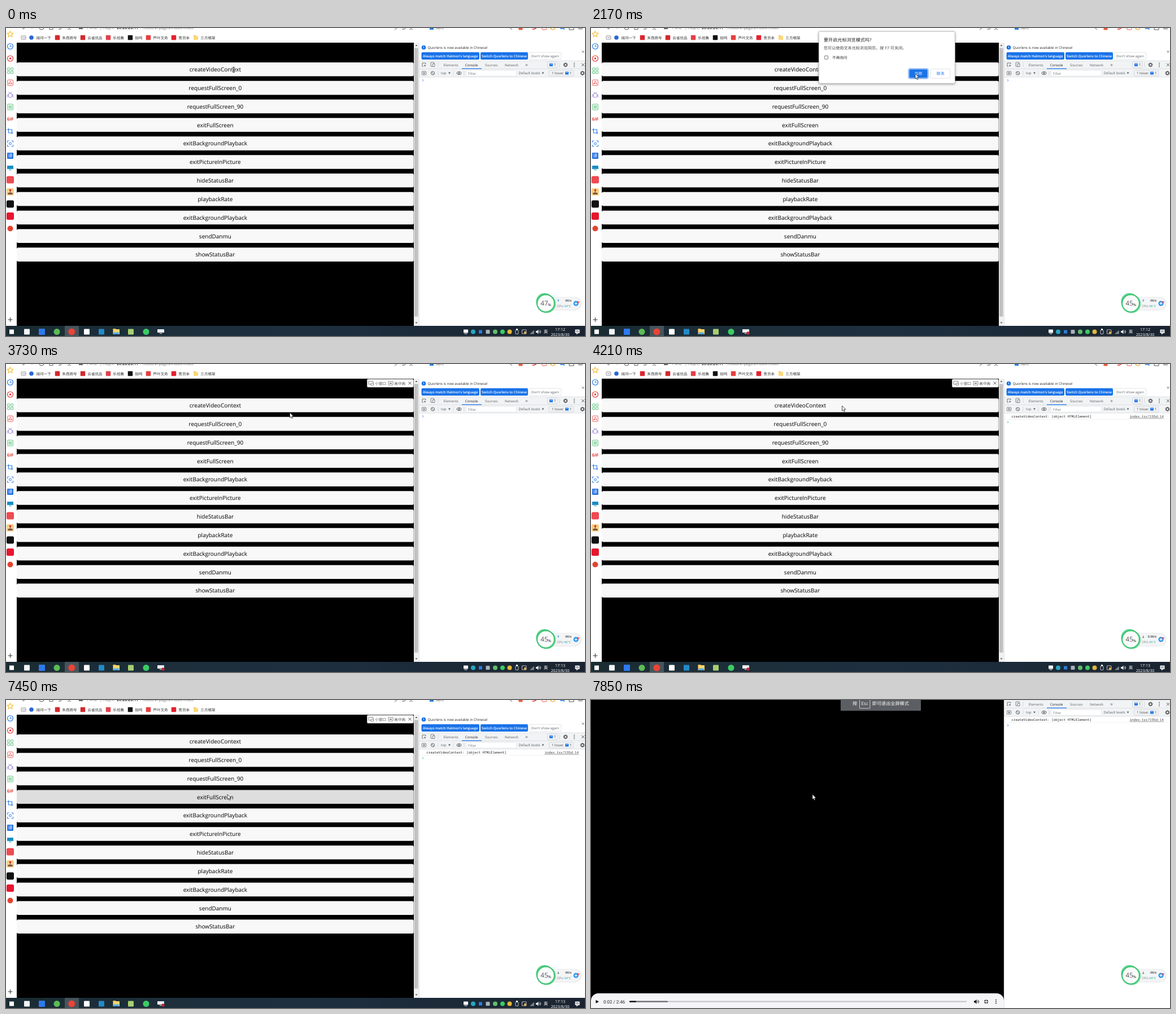
Write an HTML page with a canvas that moves like this. It is 1025 px wide and 546 px high and loops after 7990 ms.

```html
<!DOCTYPE html>
<html lang="zh">
<head>
<meta charset="utf-8">
<title>Video context demo</title>
<style>
html, body { margin: 0; width: 100%; height: 100%; overflow: hidden; background: #fff; }
canvas { display: block; width: 1025px; height: 546px; }
</style>
</head>
<body>
<canvas id="stage"></canvas>
<script>
const W = 1025, H = 546, LOOP = 7990;
const SANS = '"Open Sans", "Noto Sans CJK SC", "Noto Sans CJK", sans-serif';
const MONO = '"Noto Sans Mono", "DejaVu Sans Mono", monospace';
const BLUE = '#1a73e8', GREY = '#5f6368', RED = '#e53935', GREEN = '#2fb45a', SKY = '#2b7de9';
const canvas = document.getElementById('stage');
const ctx = canvas.getContext('2d');
const dpr = window.devicePixelRatio || 1;
canvas.width = W * dpr;
canvas.height = H * dpr;

function box(x, y, w, h, fill, r = 0, stroke) {
  ctx.beginPath();
  ctx.roundRect(x, y, w, h, r);
  if (fill) { ctx.fillStyle = fill; ctx.fill(); }
  if (stroke) { ctx.strokeStyle = stroke; ctx.lineWidth = 0.8; ctx.stroke(); }
}
function square(x, y, s, color, r = 1) { box(x - s / 2, y - s / 2, s, s, color, r); }
function disc(x, y, r, color) {
  ctx.beginPath();
  ctx.arc(x, y, r, 0, 7);
  ctx.fillStyle = color;
  ctx.fill();
}
function ring(x, y, r, color, w = 1) {
  ctx.beginPath();
  ctx.arc(x, y, r, 0, 7);
  ctx.strokeStyle = color;
  ctx.lineWidth = w;
  ctx.stroke();
}
// Points are relative to x, y; a fill colour closes the shape.
function path(x, y, pts, stroke, w = 1, fill) {
  ctx.beginPath();
  for (let i = 0; i < pts.length; i += 2) ctx.lineTo(x + pts[i], y + pts[i + 1]);
  if (fill) { ctx.closePath(); ctx.fillStyle = fill; ctx.fill(); }
  if (stroke) { ctx.strokeStyle = stroke; ctx.lineWidth = w; ctx.stroke(); }
}
function text(s, x, y, size, color = '#222', align = 'left', weight = 400, font = SANS) {
  ctx.font = `${weight} ${size}px ${font}`;
  ctx.textAlign = align;
  ctx.fillStyle = color;
  ctx.fillText(s, x, y + size * 0.36);
}
function cross(x, y, r, color, w = 0.9) {
  path(x, y, [-r, -r, r, r], color, w);
  path(x, y, [-r, r, r, -r], color, w);
}
function plus(x, y, r, color, w = 1) {
  path(x, y, [-r, 0, r, 0], color, w);
  path(x, y, [0, -r, 0, r], color, w);
}
function caret(x, y, color = GREY) { path(x, y, [-2, -1.5, 2, -1.5, 0, 1.8], null, 0, color); }
function dots(x, y, color) { for (const d of [-3, 0, 3]) disc(x, y + d, 0.9, color); }
function gear(x, y) {
  for (let i = 0; i < 8; i++) {
    const a = i * Math.PI / 4;
    path(x, y, [Math.cos(a) * 3, Math.sin(a) * 3, Math.cos(a) * 4, Math.sin(a) * 4], '#555', 1.4);
  }
  ring(x, y, 2.4, '#555', 1.5);
}
function monitorIcon(x, y, color, w = 9) {
  box(x - w / 2, y - 4, w, 6, color, 0.6);
  box(x - 2.2, y + 3, 4.4, 1, color);
}
function folder(x, y) {
  box(x - 4, y - 4, 4, 2, '#eebf4e');
  box(x - 4, y - 3, 8, 7, '#fbd775', 0.5);
}
function star(x, y, r, color, fill) {
  const pts = [];
  for (let i = 0; i < 11; i++) {
    const a = i * Math.PI / 5 - Math.PI / 2, q = i % 2 ? r * 0.48 : r;
    pts.push(q * Math.cos(a), q * Math.sin(a));
  }
  path(x, y, pts, color, 1.1, fill);
}
function speaker(x, y, color) {
  path(x, y, [-4, -1.5, -2, -1.5, 0.5, -4, 0.5, 4, -2, 1.5, -4, 1.5], null, 0, color);
  for (const r of [2, 4]) {
    ctx.beginPath();
    ctx.arc(x + 0.5, y, r, -0.9, 0.9);
    ctx.strokeStyle = color;
    ctx.lineWidth = 0.9;
    ctx.stroke();
  }
}

// Pointer moves: start, end, steps, x, y, sag.
const moves = [
  [860, 1500, 10, 577, 77, 3],
  [2030, 2170, 3, 574, 81, 0],
  [2370, 2640, 4, 575, 81.5, 0],
  [3390, 3940, 9, 444.5, 74, 9],
  [4410, 5100, 11, 392, 158, 0],
  [5250, 5320, 2, 389.5, 142, 0],
  [6580, 6650, 2, 391.5, 163, 0],
  [6980, 7050, 2, 392, 167.3, 0]
];
function stepped(t, t0, t1, n) {
  if (t < t0) return 0;
  return Math.min(1, (1 + Math.floor((t - t0) / (t1 - t0) * (n - 1) + 1e-6)) / n);
}
function pointer(t) {
  let x = 401, y = 70;
  for (const [t0, t1, n, tx, ty, sag] of moves) {
    const p = stepped(t, t0, t1, n);
    x += (tx - x) * p;
    y += (ty - y) * p + sag * Math.sin(Math.PI * p);
  }
  return [x, y];
}
function drawPointer(t) {
  if (t < 860) {
    path(403, 74, [0, -4.5, 0, 4.5], '#222', 1);
    for (const d of [-4.5, 4.5]) path(403, 74 + d, [-2, 0, 2, 0], '#222', 0.8);
    return;
  }
  const [x, y] = pointer(t);
  path(x, y, [0, 0, 0, 9, 2, 7.2, 3.4, 10.3, 5, 9.6, 3.6, 6.6, 6.3, 6.4, 0, 0], '#222', 0.8, '#fff');
}

function toolbar() {
  box(0, 0, W, 26, '#fff');
  path(31, 0, [-3, -1, 0, 2, 3, -1], GREY);
  path(47, 0, [-2, 1.5, 1, -1], '#bbb');
  ring(63, -1, 4, GREY);
  path(80, 0, [-3, -1, -3, 2.5, 3, 2.5, 3, -1], GREY);
  path(96, 0, [-3, 2, 1, 2, 3, -1], GREY);
  path(112, 0, [-3, 3, 0, 1, 3, 3], GREY);
  box(129, -3, 7, 5, '#666');
  text('不安全', 141, -1, 6.8, GREY);
  text('| http://', 166, -1, 7.2, '#777');
  text('20.20.20.17', 196, -1, 7.2, '#222', 'left', 600);
  text(':10086/#/pages/index/index', 238, -1, 7.2, '#777');
  path(690, 0, [-2, 3, 2, 0], GREY);
  path(704, 0, [-3, 2, 2, 2, 3, 0], GREY);
  path(717, 0, [-3, 3, 0, 1, 3, 3], GREY);
  box(750, -3, 7, 6, SKY);
  text('阔问', 761, -1, 7, '#666');
  path(893, 0, [-2, -1, 3, 3], GREY);
  square(911, 0, 7, '#ec5b3d');
  path(936, 0, [-4, 2, -1, 2, 3, 0], RED, 1.6);
  box(949, -3, 8, 6, null, 1, RED);
  ring(968, -1, 4, '#f5a623', 1.2);
  path(985, 0, [-4, 1, 3, 1, 3, 3], SKY, 1.3);
  path(1001, 0, [-4, -1, -4, 3, 4, 3, 4, -1], '#555');
  path(1017, 0, [-4, 1.5, 4, 1.5], '#555');

  box(27, 14, 8, 6, null, 0.5, '#777');
  path(31, 17, [-2, 0, 3, 0], '#777', 0.8);
  const marks = [
    [45, '#2865d8', '阔问一下'], [91, '#d9262c', '禾西商号'], [136, '#d3282f', '云雀优品'],
    [181, '#e2404a', '乐拾集'], [220, '#111', '拍鸣'], [252, '#e5403e', '芦叶文务'], [297, '#e6202b', '青页本']
  ];
  marks.forEach(([x, color, label], i) => {
    if (i) square(x, 17, 8.5, color); else disc(x, 17, 3.8, color);
    text(label, x + 8.3, 17.3, 6.6, '#333');
  });
  folder(336, 17);
  text('三方框架', 344.3, 17.3, 6.6, '#333');
}

function sidebar() {
  box(0, 0, 19, 528, '#fff');
  star(7.5, 11, 5.5, '#f5b31c');
  ring(7.5, 32.5, 5, SKY, 1.2);
  path(7.5, 32.5, [0, -3, 0, 0.5, 3, 0.5], SKY);
  ring(7.5, 54, 5, RED, 1.2);
  disc(7.5, 54, 1.8, RED);
  for (const dx of [0, 6]) for (const dy of [0, 6]) box(2.7 + dx, 70.7 + dy, 4, 4, null, 0.5, GREEN);
  box(2.8, 92, 9.5, 10, null, 1, RED);
  path(7.5, 97, [-3, 3, 0, -3, 3, 2, -3, 1], RED, 0.8);
  ring(7.5, 119.5, 3.8, '#8f79df');
  path(7.5, 119, [-6, 0, -3, 0, -6, 4], '#8f79df', 0.8);
  path(7.5, 119, [6, 0, 3, 0, 6, 4], '#8f79df', 0.8);
  path(7.5, 115, [-3, -2, 0, 1, 3, -2], '#8f79df', 0.8);
  box(2.8, 135, 9.5, 10, null, 1, GREEN);
  for (const d of [-2, 0, 2]) path(7.5, 140 + d, [-3, 0, 3, 0], GREEN, 0.9);
  text('GIF', 7.5, 161.5, 7.4, RED, 'center', 700);
  path(7.5, 183, [-6, -3, 3, -3, 3, 5], SKY, 1.2);
  path(7.5, 183, [-3, -5, -3, 3, 5, 3], SKY, 1.2);
  for (const sx of [-1, 1]) for (const sy of [-1, 1])
    path(7.5, 205, [2 * sx, 5 * sy, 5 * sx, 5 * sy, 5 * sx, 2 * sy], SKY, 1);
  ring(7.5, 205, 2, SKY);
  square(7.5, 226.5, 11, '#2673e5');
  text('译', 7.5, 226.5, 8, '#fff', 'center');
  monitorIcon(7.5, 248, '#168fc5', 11);
  square(7.5, 269, 13, '#ef4a51', 2.5);
  square(7.5, 290.5, 13, '#f4d083', 2.5);
  path(7.5, 290, [0, 3, 0, -2], '#555', 1.2);
  disc(7.5, 287.5, 2, RED);
  box(3.5, 292, 8, 3, '#7b5142');
  square(7.5, 312, 13, '#111', 2.5);
  square(7.5, 333.5, 13, '#e6162d', 2.5);
  disc(7.5, 355.5, 5, '#e2442f');
  plus(7.5, 517, 4, '#333');
}

const labels = ['createVideoContext', 'requestFullScreen_0', 'requestFullScreen_90', 'exitFullScreen',
  'exitBackgroundPlayback', 'exitPictureInPicture', 'hideStatusBar', 'playbackRate',
  'exitBackgroundPlayback', 'sendDanmu', 'showStatusBar'];
function page(t) {
  box(19, 26, 703, 502, '#000');
  const pressed = t >= 4100 && t < 4210 ? 0 : t >= 7450 ? 3 : -1;
  labels.forEach((label, i) => {
    const y = 61 + i * 32.83;
    box(19, y, 702.7, 24.6, i === pressed ? '#dedede' : '#f8f8f8', 2.5);
    text(label, 370.4, y + 12.5, 10, '#000', 'center');
  });
  box(722, 26, 9, 502, '#f1f1f1');
  box(723, 35.5, 6.6, 476, '#c1c1c1');
  path(726.5, 31, [-2, 1, 2, 1, 0, -1.5], null, 0, '#555');
  path(726.5, 522.5, [-2, -1, 2, -1, 0, 1.5], null, 0, '#555');
}

function badge(x, y) {
  box(x, y - 2.6, 6, 5, BLUE, 0.6);
  path(x + 1, y - 1, [0, 0, 4, 0], '#fff', 0.6);
  text('1', x + 8, y, 6.1, '#333');
}
function infoBar() {
  disc(739.5, 34.5, 3.8, BLUE);
  text('i', 739.5, 34.5, 5.5, '#fff', 'center', 700);
  text('Quorlens is now available in Chinese!', 746.5, 34.7, 6.15);
  cross(1021.5, 42, 1.6, '#555');
  box(735.5, 43, 102.5, 13, BLUE, 2);
  box(840, 43, 84, 13, BLUE, 2);
  box(926, 43.4, 57, 12.2, '#fff', 2, '#dadce0');
  text("Always match Halmon's language", 786.7, 49.6, 6.05, '#fff', 'center', 600);
  text('Switch Quorlens to Chinese', 882, 49.6, 6.05, '#fff', 'center', 600);
  text("Don't show again", 954.5, 49.6, 6.1, GREY, 'center');
}
function inspector(dy, logged) {
  const top = dy ? 0 : 26;
  box(731, top, 294, H, '#fff');
  if (!dy) infoBar();
  ctx.save();
  ctx.translate(0, dy);
  box(731, 58, 294, 29, '#f1f3f4');
  for (const y of [58, 72.3, 87]) path(731, y, [0, 0, 294, 0], '#cfd3d8', 0.6);
  path(740, 65, [3, -1, 3, -3, -3, -3, -3, 3, -1, 3], GREY, 0.9);
  path(740, 65, [0, 0, 4, 1.6, 2, 2.2, 1.4, 4], null, 0, GREY);
  box(752, 61, 6, 7, null, 0.5, GREY);
  box(755, 63.5, 4, 5, '#f1f3f4', 0.5, GREY);
  path(765, 61, [0, 0, 0, 8], '#ccc', 0.7);
  const tabs = [['Elements', 774.5], ['Console', 812.7], ['Sources', 848], ['Network', 883]];
  for (const [label, x] of tabs) text(label, x, 65.5, 6.1, label === 'Console' ? '#222' : GREY);
  box(807, 71.4, 35, 1.4, BLUE);
  text('»', 921.5, 65, 9, GREY, 'center');
  box(958.5, 60, 17.5, 10.5, '#f1f3f4', 1, '#cfd3d8');
  badge(962, 65.3);
  path(980, 61, [0, 0, 0, 9], '#ccc', 0.7);
  gear(990.5, 65.3);
  dots(1006, 65.3, '#555');
  cross(1021.5, 65.3, 2.6, '#444');

  box(736.5, 77, 7, 6, null, 0.5, GREY);
  path(739, 80, [0, -2, 3, 0, 0, 2], null, 0, GREY);
  ring(755.5, 80, 3.1, GREY);
  path(755.5, 80, [-2.1, -2.1, 2.1, 2.1], GREY);
  text('top', 770, 80.3, 6.1, GREY);
  caret(785, 80);
  for (const x of [765, 792, 811]) path(x, 76, [0, 0, 0, 8], '#d0d0d0', 0.7);
  ctx.beginPath();
  ctx.ellipse(802, 80, 4, 2.6, 0, 0, 7);
  ctx.strokeStyle = GREY;
  ctx.lineWidth = 1;
  ctx.stroke();
  disc(802, 80, 1.5, GREY);
  box(814.5, 75, 89, 10.2, '#fff', 0.5, '#e3e5e8');
  text('Filter', 818, 80.4, 6.1, '#757575');
  text('Default levels', 907.5, 80.2, 6.1, GREY);
  caret(950.5, 80);
  box(961.5, 75, 43, 10, '#f1f3f4', 1, '#cfd3d8');
  text('1 Issue:', 966, 80.2, 6.1, '#444');
  badge(990, 80);
  gear(1020.5, 80);

  if (logged) {
    text('createVideoContext: [object HTMLElement]', 744.3, 93, 5.92, '#222', 'left', 400, MONO);
    text('index.tsx?195d:14', 953.5, 93, 5.92, '#444', 'left', 400, MONO);
    path(953.5, 96.2, [0, 0, 60.4, 0], '#555', 0.6);
    path(731, 98, [0, 0, 294, 0], '#ececec', 0.7);
  }
  path(737, logged ? 103 : 92.8, [0, -1.8, 2, 0, 0, 1.8], logged && !dy ? '#4fb9a2' : '#3b86ee', 0.9);
  ctx.restore();
  path(731.3, top, [0, 0, 0, H], '#d5d5d5', 0.7);
}

function pipBar() {
  box(639.4, 27, 81.8, 14, '#fff', 1.5, '#c9cbd0');
  box(642, 30.5, 8, 5.5, null, 0.5, '#666');
  box(646, 34, 4.5, 3.5, '#fff', 0.3, '#666');
  text('小窗口', 653.3, 34.3, 6.6, '#555');
  box(677, 30.7, 8, 6.5, null, 0.5, '#666');
  box(679, 33.3, 4, 1.6, '#666');
  text('画中画', 687.3, 34.3, 6.6, '#555');
  cross(715, 34, 2.6, '#555');
}

function dialog(t) {
  if (t < 70 || t >= 3140) return;
  const opening = stepped(t, 70, 200, 3);
  const closing = t >= 2840 ? [0.1, 0.35, 0.65, 1][Math.min(3, Math.floor((t - 2840) / 66))] : 0;
  const away = Math.max(1 - opening, closing);
  ctx.save();
  ctx.globalAlpha = Math.min(opening, 1 - 0.6 * closing);
  ctx.translate(3.7 * away, 1.6 * away);
  ctx.save();
  ctx.shadowColor = 'rgba(0,0,0,.45)';
  ctx.shadowBlur = 4 * dpr;
  ctx.shadowOffsetY = dpr;
  box(403.3, 6.2, 241, 92, '#fff', 2);
  ctx.restore();
  box(403.3, 6.2, 241, 92, null, 2, '#b8b8b8');
  text('要开启光标浏览模式吗?', 412, 20.6, 8.1, '#222');
  text('您可以使用文本光标浏览网页。按 F7 可关闭。', 412, 35.7, 7.1, '#444');
  box(413.6, 49.3, 6, 6, '#fff', 0.8, '#555');
  text('不再询问', 427, 52.3, 6.7, '#333');
  box(562, 72, 35, 17.8, '#fff', 2.5, BLUE);
  box(563.3, 73.3, 32.4, 15.2, BLUE, 1.5);
  text('启用', 579.5, 81, 6.7, '#fff', 'center');
  box(601.4, 72.6, 34.2, 16.6, '#fff', 2, '#dadce0');
  text('取消', 618.5, 81, 6.7, BLUE, 'center');
  ctx.restore();
}

function last(t, steps) {
  return steps.reduce((v, [at, value]) => t >= at ? value : v, null);
}
function gauge(t) {
  ctx.save();
  ctx.shadowColor = 'rgba(0,0,0,.25)';
  ctx.shadowBlur = 2 * dpr;
  box(956, 478, 62, 21.5, '#f3f5f7', 10.5);
  ctx.restore();
  disc(953.5, 485.3, 15.2, '#58d38b');
  disc(957, 489, 16.3, '#7cdc9f');
  ring(955.5, 488, 15.5, '#3fc476', 2);
  disc(955.5, 488, 14.2, '#fafcfb');
  text(last(t, [[0, '47'], [1140, '46'], [2100, '45']]), 946.3, 488, 11.8, '#555');
  text('%', 959.3, 490.2, 6.6, '#555', 'left', 600);
  const down = t >= 4100;
  path(977.7, 483.5, down ? [-1.6, 0.4, 0, 2, 1.6, 0.4] : [-1.6, -0.4, 0, -2, 1.6, -0.4], down ? '#555' : SKY, 0.8);
  path(977.7, 483.5, [0, -2, 0, 2], down ? '#555' : SKY, 0.8);
  text(last(t, [[0, '0'], [4100, '0.5'], [6120, '0']]) + 'K/s', 1001, 483.6, 5.2, '#222', 'right', 600);
  text('CPU', 975.3, 493.2, 5.7, '#777');
  const temp = last(t, [[0, 44], [1140, 45], [2100, 46], [4100, 45], [4800, 46], [6120, 45], [7000, 44]]);
  text(temp + '°C', 987.7, 493.2, 5.7, '#35a79c');
  disc(1009, 488.3, 4.5, '#3098ea');
  plus(1009, 488.3, 2.4, '#fff', 1.2);
  disc(1013, 486, 1.8, '#f4524d');
}

function taskbar(t) {
  const bg = ctx.createLinearGradient(0, 0, W, 0);
  bg.addColorStop(0, '#1b2c33');
  bg.addColorStop(0.5, '#1e3040');
  bg.addColorStop(1, '#1a2430');
  box(0, 528, W, 18, bg);
  box(104, 528, 25, 18, '#46545c');
  square(10, 538.5, 8, '#fff', 0);
  square(37, 538.5, 10, '#f2f4f6');
  square(63.5, 538.5, 11, '#2f79ee');
  disc(90, 538.5, 5.5, '#5dbb55');
  disc(116.3, 538.5, 6, '#e94435');
  square(143, 538.5, 10, '#fff');
  square(169, 538.5, 10, '#2489ca');
  box(189.5, 533, 5, 2, '#e8b53b');
  box(189.5, 534, 11.5, 9, '#fbd66b', 0.5);
  box(190.5, 539.5, 9.5, 3.5, '#55a9e6');
  square(221, 538.5, 10, '#a7cf71');
  disc(248, 538.5, 5.5, '#3bcb62');
  monitorIcon(274, 538, '#e9edf0', 12);
  if (t >= 70) disc(278, 541, 2.7, '#bf2731');
  monitorIcon(814, 538.5, '#f5f5f5', 8);
  disc(827, 538.5, 4, '#23a7c4');
  square(840, 538.5, 6, '#2d7de0');
  square(853, 538.5, 7, '#aab2b8');
  disc(866, 538.5, 4, '#60bd68');
  disc(879, 538.5, 4, '#3bcb62');
  disc(891.5, 538.5, 4, '#e2b83a');
  box(902, 535.5, 5, 7, null, 1, '#eee');
  box(903, 533, 3, 2.5, '#eee');
  box(913.5, 535, 7.5, 7, null, 0.5, '#eee');
  square(919, 540, 4, '#e5af43');
  for (let i = 0; i < 4; i++) box(928 + i * 1.8, 541 - i * 1.6, 1.2, 1.5 + i * 1.6, '#a9b2b9');
  speaker(942, 538.5, '#eee');
  text('英', 955.5, 538.5, 7.6, '#fff', 'center');
  text(t < 2500 ? '17:12' : '17:13', 981, 534, 7, '#fff', 'center');
  text('2023/8/30', 981, 543.3, 6.9, '#fff', 'center');
  box(1007.5, 534.5, 8, 6.5, '#f3f3f3', 0.5);
  path(1010, 541, [0, 0, 0, 2.5, 3, 0], null, 0, '#f3f3f3');
  path(1009, 536.7, [0, 0, 5, 0], '#445', 0.7);
  path(1009, 538.7, [0, 0, 5, 0], '#445', 0.7);
}

// Name | time | type | size in KB
const files = `.swc|16:31|文件夹
__tests__|15:54|文件夹
config|15:54|文件夹
dist|16:31|文件夹
node_modules|16:31|文件夹
src|15:54|文件夹
types|15:54|文件夹
.editorconfig|15:54|EDITORCONFIG ...|1
.env.dev|15:54|DEV 文件|1
.env.prod|15:54|PROD 文件|1
.env.test|15:54|TEST 文件|1
.eslintrc|15:54|ESLINTRC 文件|1
.gitignore|15:54|文本文档|1
babel.config|15:54|JavaScript 文件|1
interfaceNotSupport|16:47|GIF 文件|587
jest.config|15:54|MPEG-2 TS 视频|1
package.json|15:54|JSON 文件|3
pnpm-lock.yaml|15:56|YAML 文件|511
project.config.json|15:54|JSON 文件|1
project.tt.json|15:54|JSON 文件|1
requestFullScreen|17:11|GIF 文件|569
tsconfig.json|15:54|JSON 文件|1`.split('\n').map(row => row.split('|'));

function fileIcon(name, isFolder, x, y) {
  if (isFolder) folder(x, y);
  else {
    const gif = /Support|Screen$/.test(name);
    box(x - 3.2, y - 4, 7, 8, gif ? '#9cc9ee' : '#fff', 0.4, name === 'babel.config' ? '#333' : '#a5a5a5');
  }
  if (['.swc', 'dist', 'node_modules'].includes(name)) return;
  disc(x - 1.3, y + 1.8, 2.9, '#31a442');
  path(x - 1.3, y + 1.8, [-1.4, 0, -0.3, 1.1, 1.6, -1.2], '#fff', 0.8);
}
function chevron(x, y, down) {
  path(x, y, down ? [-1.8, -1, 0, 1, 1.8, -1] : [-1, -1.8, 1, 0, -1, 1.8], '#777', 0.8);
}
function explorer() {
  box(0, 0, W, 528, '#fff');
  path(7, 6, [3, 0, -3, 0, -0.5, -2.5, -3, 0, -0.5, 2.5], '#444', 0.9);
  path(23, 6, [-3, 0, 3, 0, 0.5, -2.5, 3, 0, 0.5, 2.5], '#bbb', 0.9);
  chevron(36, 6, true);
  path(46, 6, [0, 3, 0, -3, -2.5, -0.5, 0, -3, 2.5, -0.5], '#444', 0.9);
  box(53.4, -4, 837, 18, null, 0, '#d9d9d9');
  box(890.4, -4, 18, 18, null, 0, '#d9d9d9');
  box(914.4, -4, 116, 18, null, 0, '#d9d9d9');
  folder(60, 6);
  const crumbs = [['此电脑', 76], ['文档 (F:)', 109], ['code', 147], ['test', 176],
    ['taro-demo', 200.5], ['videoContextDemo', 248], ['videoContextDemo', 321]];
  for (const [name, x] of crumbs) {
    chevron(x - 7.3, 6);
    text(name, x, 6, 6.7);
  }
  chevron(883, 6, true);
  ring(899.5, 6, 2.4, '#555', 0.8);
  path(901, 4, [-1, 0, 1.5, 0, 1.5, -2], '#555', 0.7);
  ring(1015.5, 5, 2.3, '#555', 0.9);
  path(1014, 7, [0, 0, -2.5, 2.5], '#555');

  path(81.5, 18, [0, 0, 0, 496], '#efefef', 0.8);
  star(14.5, 33.5, 3.6, null, '#2f92dc');
  text('快速访问', 21, 33.3, 6.6);
  ['桌面', '下载', '文档', '图片'].forEach((name, i) => {
    const y = 46.3 + i * 12.9;
    if (i === 1) path(18, y, [-1, -4, 1, -4, 1, 0, 3.5, 0, 0, 4, -3.5, 0, -1, 0], null, 0, '#2c8ad0');
    else box(14.3, y - 3, 7.6, 6.4, ['#1f93e0', '', '#eef3f7', '#8cb9d6'][i], 0.4, '#6e9ab8');
    text(name, 25, y, 6.6);
    path(76, y, [-2.5, 2.5, 0, 0], '#777', 0.7);
    square(76.8, y - 1, 2.8, '#888');
  });
  ['2023-07', 'install package', 'test', 'test'].forEach((name, i) => {
    folder(18, 98 + i * 12.8);
    text(name, 25, 98 + i * 12.8, 6.7);
  });
  disc(14, 154, 4, '#1a7ccc');
  text('Velnadok - Persona', 21, 154, 6.7);
  box(0, 164.5, 81, 13, '#d9d9d9');
  monitorIcon(14, 171, '#3a8fcf');
  text('此电脑', 21, 171, 6.6);
  monitorIcon(14, 188, '#328fd0', 8);
  text('网络', 21, 188, 6.6);

  [['名称', 92], ['修改日期', 232], ['类型', 309.7], ['大小', 374]]
    .forEach(([name, x]) => text(name, x, 25.8, 6.6, '#4c607a'));
  path(158, 19.5, [-2, 1, 0, -1, 2, 1], '#777', 0.8);
  for (const x of [229, 306.5, 371, 414]) path(x, 19, [0, 0, 0, 14], '#e5e5e5', 0.8);
  files.forEach(([name, time, type, size], i) => {
    const y = 42 + i * 11.29;
    if (name === '.eslintrc') box(90, y - 5.7, 321.5, 11.3, '#e5f3ff');
    if (name === 'requestFullScreen') box(90, y - 5.7, 321.5, 11.3, '#d9d9d9');
    fileIcon(name, !size, 97, y);
    text(name, 103.3, y, 6.7);
    text('2023/8/30 ' + time, 232, y, 6.7, '#6d6d6d');
    text(type, 309.7, y, 6.5, '#6d6d6d');
    if (size) text(size + ' KB', 409.8, y, 6.7, '#6d6d6d', 'right');
  });
  text('22 个项目', 4, 521.3, 6.6, '#1e395b');
  text('选中 1 个项目  568 KB', 44.5, 521.3, 6.6, '#1e395b');
  box(1003.5, 515.5, 11.5, 11.5, '#cce8ff', 0, '#88c3ee');
  for (const d of [-3, 0, 3]) path(1006, 521.2 + d, [0, 0, 7, 0], '#467', 0.8);
  box(1017.5, 518.5, 7, 5, '#6a9abb', 0, '#557');
}

function video(t) {
  box(0, 0, 731, H, '#000');
  inspector(-58, true);
  box(0, 520, 731, 30, '#f5f4f7', [13, 13, 0, 0]);
  path(11, 534.7, [-2.5, -3, 3, 0, -2.5, 3], null, 0, '#111');
  text('0:02 / 2:46', 22, 534.8, 8, '#222', 'left', 400, 'Roboto, sans-serif');
  box(68, 533.6, 597, 2.2, '#c7c6c9', 1);
  box(68, 533.6, 68, 2.2, '#706f73', 1);
  box(68, 533.6, 12, 2.2, '#111', 1);
  speaker(682, 534.7, '#111');
  for (const sx of [-1, 1]) for (const sy of [-1, 1])
    path(699.6, 534.7, [1.4 * sx, 3.5 * sy, 1.4 * sx, 1.4 * sy, 3.5 * sx, 1.4 * sy], '#111', 1.2);
  dots(717, 534.7, '#111');
  if (t < 7850) return;
  box(442, 0, 142, 19, '#5b5e62');
  text('按', 463, 6.5, 8.2, '#fff');
  box(475.5, -3, 18.4, 17.8, null, 1, '#e8e8e8');
  text('Esc', 484.7, 6.5, 8.2, '#fff', 'center');
  text('即可退出全屏模式', 497.8, 6.5, 8.15, '#fff');
}

function draw(t) {
  ctx.setTransform(dpr, 0, 0, dpr, 0, 0);
  ctx.textRendering = 'geometricPrecision';
  if (t >= 7660) video(t);
  else {
    if (t >= 7520) explorer();
    else {
      toolbar();
      sidebar();
      page(t);
      inspector(0, t >= 4150);
    }
    if (t >= 2900) pipBar();
    dialog(t);
    taskbar(t);
  }
  gauge(t);
  drawPointer(t);
}

const start = performance.now();
function tick() {
  draw((performance.now() - start) % LOOP);
  requestAnimationFrame(tick);
}
tick();
</script>
</body>
</html>
```
